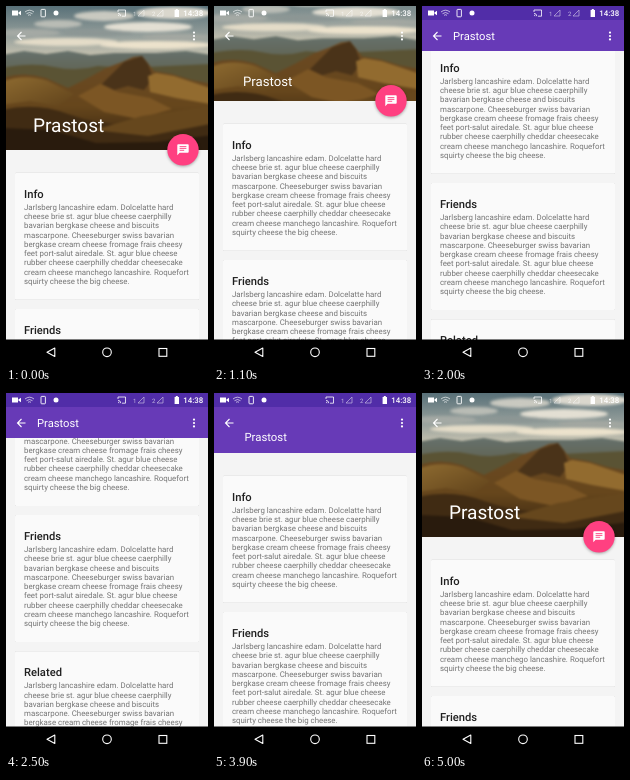
An HTML page for the animation above (5100 ms loop, 202 px wide and 359 px high).

```html
<!DOCTYPE html>
<html lang="en">
<head>
<meta charset="utf-8">
<title>Collapsing header</title>
<style>
html, body { margin: 0; width: 100%; height: 100%; overflow: hidden; background: #f4f4f4; }
svg { display: block; width: 100vw; height: 100vh; }
text { font-family: Roboto, sans-serif; text-rendering: geometricPrecision; }
.card { fill: #fafafa; filter: drop-shadow(0 .9px .7px rgba(0,0,0,.26)); }
.head { font-size: 11.2px; font-weight: 500; fill: #202020; }
.body { font-size: 7.86px; fill: #747474; }
.soft { filter: blur(1.8px); }
.haze { filter: blur(.9px); }
.line { fill: none; stroke: #fff; }
</style>
</head>
<body>
<svg viewBox="0 0 202 359">
  <defs>
    <linearGradient id="sky" x2="0" y2="1">
      <stop offset="0" stop-color="#587078"/>
      <stop offset=".5" stop-color="#98a19d"/>
      <stop offset="1" stop-color="#e2d6bb"/>
    </linearGradient>
    <linearGradient id="far" x2="0" y2="1">
      <stop offset="0" stop-color="#66716c"/>
      <stop offset="1" stop-color="#5a5130"/>
    </linearGradient>
    <linearGradient id="hill" x2="0" y2="1">
      <stop offset="0" stop-color="#6b4a24"/>
      <stop offset=".5" stop-color="#66461c"/>
      <stop offset="1" stop-color="#2b1c0c"/>
    </linearGradient>
    <linearGradient id="slope" x2="1" y2="1">
      <stop offset="0" stop-color="#8d6a30"/>
      <stop offset="1" stop-color="#61431b"/>
    </linearGradient>
    <clipPath id="clip"><rect id="window" width="202" height="144"/></clipPath>
  </defs>
  <rect width="202" height="359" fill="#f4f4f4"/>
  <g id="cards"></g>

  <g clip-path="url(#clip)">
    <g id="photo">
      <rect width="202" height="62" fill="url(#sky)"/>
      <g class="soft">
        <ellipse cx="98" cy="10" rx="30" ry="5" fill="#c9c9c0"/>
        <ellipse cx="168" cy="7" rx="38" ry="6" fill="#dad7cd"/>
        <ellipse cx="52" cy="18" rx="24" ry="4" fill="#b9bcb5"/>
        <ellipse cx="142" cy="21" rx="44" ry="5" fill="#e3dfd3"/>
        <ellipse cx="22" cy="27" rx="32" ry="4" fill="#a4a9a4"/>
        <ellipse cx="92" cy="27" rx="36" ry="3" fill="#8c9694"/>
        <ellipse cx="170" cy="31" rx="34" ry="3" fill="#a3a7a1"/>
        <ellipse cx="60" cy="36" rx="52" ry="4" fill="#e4dcc8"/>
        <ellipse cx="150" cy="39" rx="56" ry="4" fill="#ece2cc"/>
      </g>
      <g class="haze">
        <path d="M-4 49L18 45 40 48 62 45 84 49 108 47 150 47 180 45 206 49V100H-4Z" fill="url(#far)"/>
        <path d="M-4 62Q26 56 48 61T92 60L120 62 206 58V100H-4Z" fill="#5a5334"/>
        <path d="M-4 72Q18 65 40 72L62 82 82 72 100 62 116 56 127 51 136 50 141 56 148 65 166 68 186 74 206 78V150H-4Z" fill="url(#hill)"/>
        <path d="M-4 76Q18 67 42 75L68 88 52 100 24 95-4 99Z" fill="url(#slope)"/>
        <path d="M118 56L136 50 142 58 147 72 138 84 122 80 108 84 96 78Z" fill="#4a3319"/>
        <path d="M142 70L150 67 168 70 204 82V98L170 92 144 86Z" fill="#926b2f"/>
        <path d="M72 90L94 78 112 86 144 92 166 103 132 113 98 106Z" fill="#7c5624"/>
        <path d="M-4 104Q30 96 62 108T130 119L206 112V150H-4Z" fill="#402b13"/>
        <path d="M88 124L136 110 204 100V118L142 130Z" fill="#66471d"/>
        <path d="M-4 122L46 124 90 137 150 136 206 129V150H-4Z" fill="#291b0d"/>
      </g>
    </g>
    <g id="scrim">
      <rect width="202" height="144" fill="#673ab7"/>
      <rect width="202" height="14" fill="#512da8"/>
    </g>
  </g>

  <text id="title" fill="#fff">Prastost</text>
  <path class="line" stroke-width="1.1" d="M19.5 30H11.7M15.5 26L11.5 30 15.5 34"/>
  <g fill="#fff">
    <circle cx="188" cy="26.6" r="1.1"/><circle cx="188" cy="30" r="1.1"/><circle cx="188" cy="33.4" r="1.1"/>
  </g>

  <g fill="#fff">
    <path d="M6 4.5h6v5H6zM12.4 6.4L15 4.7v4.6L12.4 7.6z"/>
    <path class="line" stroke-width=".8" opacity=".8" d="M19 6Q23.5 2.4 28 6M20.5 7.7Q23.5 5.3 26.5 7.7M22 9.3Q23.5 8.2 25 9.3"/>
    <rect class="line" x="35" y="3.4" width="4.4" height="7.4" rx=".7" stroke-width=".9"/>
    <circle cx="50" cy="7" r="2.5"/>
    <path class="line" stroke-width=".8" d="M112 6V4h7.5v6.2H116M112 7.4q2.6 0 2.8 2.8M112 9.2q1 0 1 1"/>
    <g opacity=".65">
      <text x="127" y="10" font-size="6">1</text>
      <path class="line" stroke-width=".7" d="M132 10L138 4V10Z"/>
      <text x="146" y="10" font-size="6">2</text>
      <path class="line" stroke-width=".7" d="M151 10L157 4V10Z"/>
    </g>
    <path d="M168.6 4h1.2V3h2v1H173v7h-4.4z"/>
    <text x="177.3" y="10.2" font-size="7.9" font-weight="500">14:38</text>
  </g>

  <g id="fab">
    <circle r="15.7" fill="#ff4081" style="filter:drop-shadow(0 1.4px 1.4px rgba(0,0,0,.32))"/>
    <path d="M-4.8-5.6H4.8Q5.7-5.6 5.7-4.7V2Q5.7 2.9 4.8 2.9H-3.4L-5.7 5.4V-4.7Q-5.7-5.6-4.8-5.6Z" fill="#fff"/>
    <path d="M-3.4-3.2H3.4M-3.4-1.4H3.4M-3.4.5H1.2" stroke="#ff4081" stroke-width=".9"/>
  </g>

  <rect y="333.5" width="202" height="26" fill="#000"/>
  <g class="line" stroke-width="1.1">
    <path d="M48.8 342.1V350.5L41 346.3Z" stroke-linejoin="round"/>
    <circle cx="101" cy="346.3" r="4.3"/>
    <rect x="153" y="342.5" width="7.8" height="7.8"/>
  </g>
</svg>
<script>
const LOOP = 5100, STEP = 100, TALL = 144, RANGE = 99;
const el = id => document.getElementById(id);
const clamp = x => Math.min(1, Math.max(0, x));
const mix = (a, b, p) => a + (b - a) * p;
const ramp = (t, a, b) => clamp((t - a) / (b - a));

const lines = [
  "Jarlsberg lancashire edam. Dolcelatte hard",
  "cheese brie st. agur blue cheese caerphilly",
  "bavarian bergkase cheese and biscuits",
  "mascarpone. Cheeseburger swiss bavarian",
  "bergkase cream cheese fromage frais cheesy",
  "feet port-salut airedale. St. agur blue cheese",
  "rubber cheese caerphilly cheddar cheesecake",
  "cream cheese manchego lancashire. Roquefort",
  "squirty cheese the big cheese."
];

el("cards").innerHTML = ["Info", "Friends", "Related"].map((name, i) =>
  `<g transform="translate(0 ${166.8 + i * 136.2})">
    <rect class="card" x="9" width="184" height="127" rx="1.1"/>
    <text class="head" x="18" y="25">${name}</text>
    ${lines.map((s, n) => `<text class="body" x="18" y="${37 + n * 9.25}">${s}</text>`).join("")}
  </g>`).join("");

// Scroll offset over time, joined by a monotone cubic
const keys = [[0, 0], [300, 0], [700, 20], [1100, 49], [2000, 126], [2700, 190],
  [3100, 173.5], [3900, 84], [4300, 47], [4850, 0], [LOOP, 0]];
const grade = i => (keys[i + 1][1] - keys[i][1]) / (keys[i + 1][0] - keys[i][0]);

function slope(i) {
  if (i === 0 || i === keys.length - 1) return 0;
  const a = grade(i - 1), b = grade(i);
  return a * b <= 0 ? 0 : 2 * a * b / (a + b);
}

function scrollAt(t) {
  const i = keys.findIndex((k, n) => n < keys.length - 1 && t < keys[n + 1][0]);
  const [t0, y0] = keys[i], [t1, y1] = keys[i + 1];
  const d = t1 - t0, p = (t - t0) / d, q = 1 - p;
  return y0 * q * q * (1 + 2 * p) + y1 * p * p * (1 + 2 * q)
    + d * p * q * (slope(i) * q - slope(i + 1) * p);
}

function draw(t) {
  const scroll = scrollAt(t);
  const shut = Math.min(scroll, RANGE), fold = shut / RANGE;
  const edge = TALL - shut;

  el("cards").setAttribute("transform", `translate(0 ${-scroll})`);
  el("window").setAttribute("height", edge);
  el("photo").setAttribute("transform", `translate(0 ${-shut * .3})`);
  el("scrim").setAttribute("opacity", ramp(t, 1150, 1650) - ramp(t, 4020, 4540));

  const title = el("title");
  title.setAttribute("x", mix(27, 31, fold));
  title.setAttribute("y", mix(126, 34, fold));
  title.setAttribute("font-size", mix(19.07, 11.2, 1 - (1 - fold) ** 2));

  const size = 1 - ramp(t, 1150, 1350) + ramp(t, 4050, 4250);
  el("fab").setAttribute("transform", `translate(177 ${edge - .2}) scale(${size})`);
  el("fab").setAttribute("visibility", size > 0 ? "visible" : "hidden");
}

function tick() {
  draw(Math.floor(performance.now() % LOOP / STEP) * STEP);
  requestAnimationFrame(tick);
}
tick();
</script>
</body>
</html>
```
